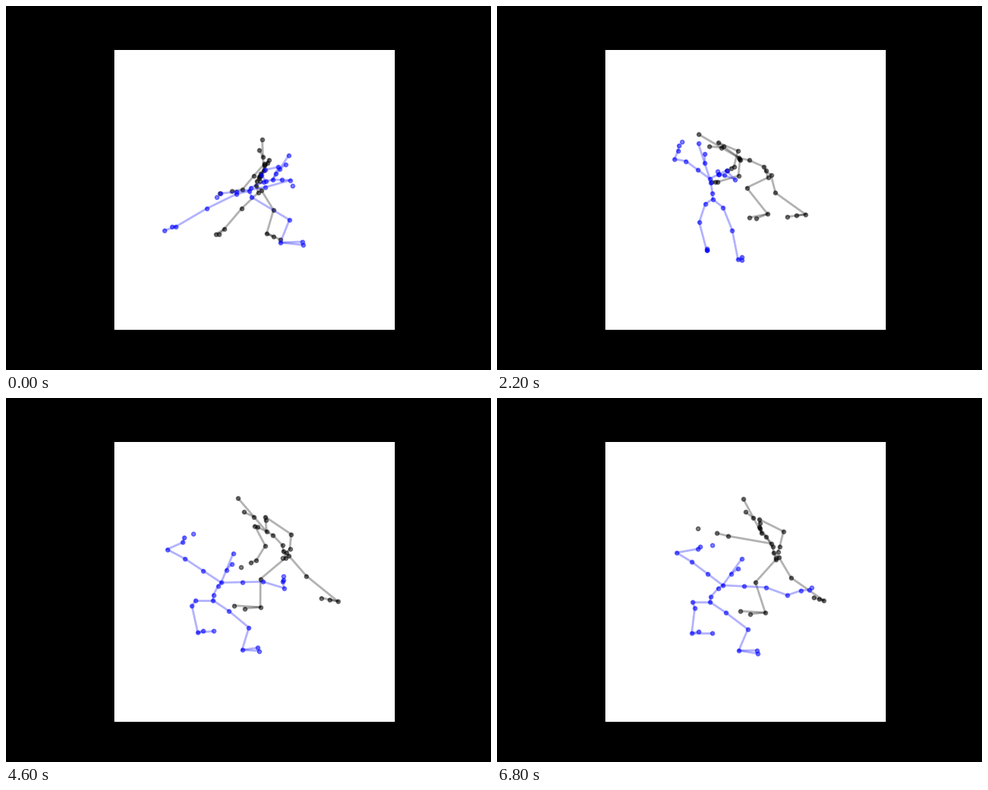
Recreate the animation shown at these times as a matplotlib script. Size 640x480 px, loop 6.9 s.

```python
import numpy as np
import matplotlib.pyplot as plt
from matplotlib.animation import FuncAnimation
from matplotlib.collections import LineCollection

W, H, DPI = 640, 480, 100
FRAMES, STEP = 69, 100


def glide(keys):
    """Smooth path through {step: (x, y)}, one point per frame; holds after the last key."""
    t = np.array(list(keys), float)
    p = np.array(list(keys.values()), float)
    slope = np.gradient(p, t, axis=0)
    now = np.clip(np.arange(FRAMES), t[0], t[-1])
    i = np.clip(np.searchsorted(t, now, side="right") - 1, 0, len(t) - 2)
    span = (t[i + 1] - t[i])[:, None]
    u = (now - t[i])[:, None] / span
    return ((1 + 2 * u) * (1 - u) ** 2 * p[i]
            + u * (1 - u) ** 2 * span * slope[i]
            + u ** 2 * (3 - 2 * u) * p[i + 1]
            + u ** 2 * (u - 1) * span * slope[i + 1])


def turn(v, degrees):
    c, s = np.cos(np.radians(degrees)), np.sin(np.radians(degrees))
    return v @ np.array([[c, -s], [s, c]])


class Body:
    def __init__(self, ax, color, z):
        self.points, self.bones = [], []
        self.lines = LineCollection([], colors=color, alpha=0.3, linewidths=2,
                                    capstyle="projecting", zorder=z)
        ax.add_collection(self.lines)
        self.dots = ax.scatter([], [], s=14, color=color, alpha=0.5, zorder=z + 1)

    def chain(self, start, *paths):
        """Add joints, each tied to the one before it."""
        for path in paths:
            self.points.append(path)
            if start is not None:
                self.bones.append((start, path))
            start = path

    def trunk(self, root, chest, head, nod):
        """Spine, neck and face; the nose is a shorter, turned copy of the head."""
        self.root = glide(root)
        rise, crown = glide(chest), glide(head)
        self.chest = self.root + rise
        neck = self.chest + 0.44 * crown
        nose = neck + 0.45 * turn(0.56 * crown, nod)
        self.chain(None, self.root, self.root + rise * (0.06, 0.3),
                   self.root + rise * (0.62, 0.81), self.chest, neck, self.chest + crown)
        self.chain(neck, nose)

    def arm(self, shoulder, elbow, wrist, tip, reach, collar, palm):
        """The shoulder lies part of the way to the elbow, plus an offset."""
        upper = glide(elbow)
        joint = reach * upper + glide(shoulder)
        elbow = self.chest + upper
        wrist, tip = elbow + glide(wrist), glide(tip)
        self.chain(self.chest, self.chest + collar * joint, self.chest + joint,
                   elbow, wrist, wrist + palm * tip)
        self.chain(None, wrist + tip)

    def leg(self, hip, knee, ankle, toe, ball, lift):
        hip = self.root + (glide(hip) if isinstance(hip, dict) else hip)
        knee = hip + glide(knee)
        ankle, toe = knee + glide(ankle), glide(toe)
        self.chain(self.root, hip, knee, ankle, ankle + toe)
        self.chain(ankle, ankle + ball * toe + (0, lift))

    def pose(self, n):
        self.lines.set_segments([(a[n], b[n]) for a, b in self.bones])
        self.dots.set_offsets([p[n] for p in self.points])


fig = plt.figure(figsize=(W / DPI, H / DPI), dpi=DPI, facecolor="black")
left, right, top, bottom = 143, 513, 58, 427
ax = fig.add_axes([left / W, 1 - bottom / H, (right - left) / W, (bottom - top) / H])
ax.set(xlim=(left, right), ylim=(bottom, top), facecolor="white", xticks=[], yticks=[])
for spine in ax.spines.values():
    spine.set_visible(False)

black = Body(ax, "black", 2)
blue = Body(ax, "blue", 4)

blue.trunk(root={0: (321, 244), 8: (312, 250), 16: (295, 252), 28: (277, 258), 38: (273, 264), 68: (281, 269)},
           chest={0: (31, -15), 8: (3, -25), 16: (-4, -27), 38: (8, -24), 68: (17, -22)},
           head={0: (21, -32), 16: (-16, -46), 38: (10, -40), 68: (25, -35)},
           nod=-20)
blue.arm(shoulder={0: (14, -8), 8: (3, -12), 28: (0, -2)},
         elbow={0: (-10, -13), 16: (-31, -19), 28: (-61, -33), 38: (-70, -41), 68: (-61, -43)},
         wrist={0: (-5, 7), 16: (1, -9), 38: (17, -10), 68: (28, -5)},
         tip={0: (41, 14), 8: (-3, 2), 16: (2, -7), 68: (19, -5)},
         reach=2 / 3, collar=0.5, palm=(0.15, 0.6))
blue.arm(shoulder={0: (30, -6), 8: (7, -17), 28: (0, -6)},
         elbow={0: (-10, 10), 8: (-5, 10), 16: (14, 2), 28: (52, 2), 38: (74, 5), 68: (85, 13)},
         wrist={0: (-38, 6), 8: (-3, 10), 16: (-11, 0), 68: (18, -6)},
         tip={0: (-26, 7), 8: (-2, 4), 16: (-7, -2), 68: (14, -4)},
         reach=2 / 3, collar=0.5, palm=(0.8, 0.3))
blue.leg(hip={0: (-17, 4), 8: (-7, 6), 16: (-7, 7), 38: (-23, 0)},
         knee={0: (-39, 19), 16: (-12, 27), 38: (-7, 10), 68: (3, 8)},
         ankle={0: (-41, 24), 8: (-11, 39), 16: (3, 38), 68: (-4, 33)},
         toe={0: (-15, 5), 16: (-5, 1), 38: (16, -2), 68: (27, 0)},
         ball=0.35, lift=-2)
blue.leg(hip={0: (3, 8), 16: (11, 10), 38: (21, 14)},
         knee={0: (50, 30), 8: (12, 26), 16: (10, 30), 38: (24, 23), 68: (29, 22)},
         ankle={0: (-12, 30), 8: (9, 32), 16: (10, 38), 38: (-5, 31), 53: (-12, 28)},
         toe={0: (30, 3), 8: (6, 3), 16: (3, 2), 38: (19, 1), 68: (25, 4)},
         ball=0.95, lift=-4)

black.trunk(root={0: (330, 237), 8: (331, 238), 16: (350, 218), 28: (356, 219), 38: (363, 208),
                  53: (367, 199), 68: (365, 204)},
            chest={0: (10, -20), 8: (-2, -19), 16: (-27, -16), 38: (-28, -25), 53: (-16, -26)},
            head={0: (-2, -41), 8: (-11, -37), 16: (-42, -31), 38: (-49, -41), 53: (-28, -46), 68: (-24, -45)},
            nod=25)
black.arm(shoulder={0: (1, -9), 16: (-27, -18), 38: (-12, -22), 53: (5, -17), 68: (-3, -18)},
          elbow={0: (-13, 7), 8: (-26, -1), 16: (-12, -8), 38: (22, -2), 53: (38, 7), 68: (29, -2)},
          wrist={0: (-15, 18), 8: (-5, 21), 38: (-9, 18), 53: (3, 20), 68: (-5, 20)},
          tip={0: (-30, 5), 8: (-8, 4), 38: (-22, 9), 53: (0, 14), 68: (-5, 15)},
          reach=0, collar=0.75, palm=0.47)
black.arm(shoulder={0: (7, -14), 16: (4, 1), 53: (-15, -9), 68: (-3, -8)},
          elbow={0: (-4, 7), 8: (12, 7), 16: (2, 19), 38: (1, 23), 53: (-2, 15), 68: (13, 14)},
          wrist={0: (-2, 1), 8: (0, 21), 16: (-26, 9), 38: (-3, 21), 53: (-24, 14), 68: (-57, -10)},
          tip={0: (1, 6), 8: (20, 6), 28: (-18, 1), 38: (-14, 13), 53: (-28, 2), 68: (-40, -10)},
          reach=0, collar=0.75, palm=0.37)
black.leg(hip=(3, 9),
          knee={0: (-22, 21), 8: (-9, 31), 16: (-22, 16), 38: (-33, 26), 68: (-27, 30)},
          ankle={0: (-23, 27), 8: (2, 32), 16: (25, 34), 38: (3, 35), 53: (0, 39), 68: (13, 40)},
          toe={0: (-11, 7), 8: (-11, 12), 28: (-30, 1), 68: (-33, -2)},
          ball=0.6, lift=3)
black.leg(hip=(7, 6),
          knee={0: (16, 26), 16: (11, 35), 28: (4, 13), 38: (19, 23), 68: (16, 27)},
          ankle={0: (-9, 31), 8: (1, 35), 16: (19, 35), 28: (55, 23), 38: (45, 31), 68: (43, 30)},
          toe={0: (18, 8), 8: (6, 3), 16: (-19, 6), 28: (-24, -1), 68: (-13, -4)},
          ball=0.5, lift=0)


def draw(n):
    for body in (black, blue):
        body.pose(n)
    return black.lines, black.dots, blue.lines, blue.dots


anim = FuncAnimation(fig, draw, frames=FRAMES, interval=STEP, repeat=True, repeat_delay=0)
plt.show()
```
